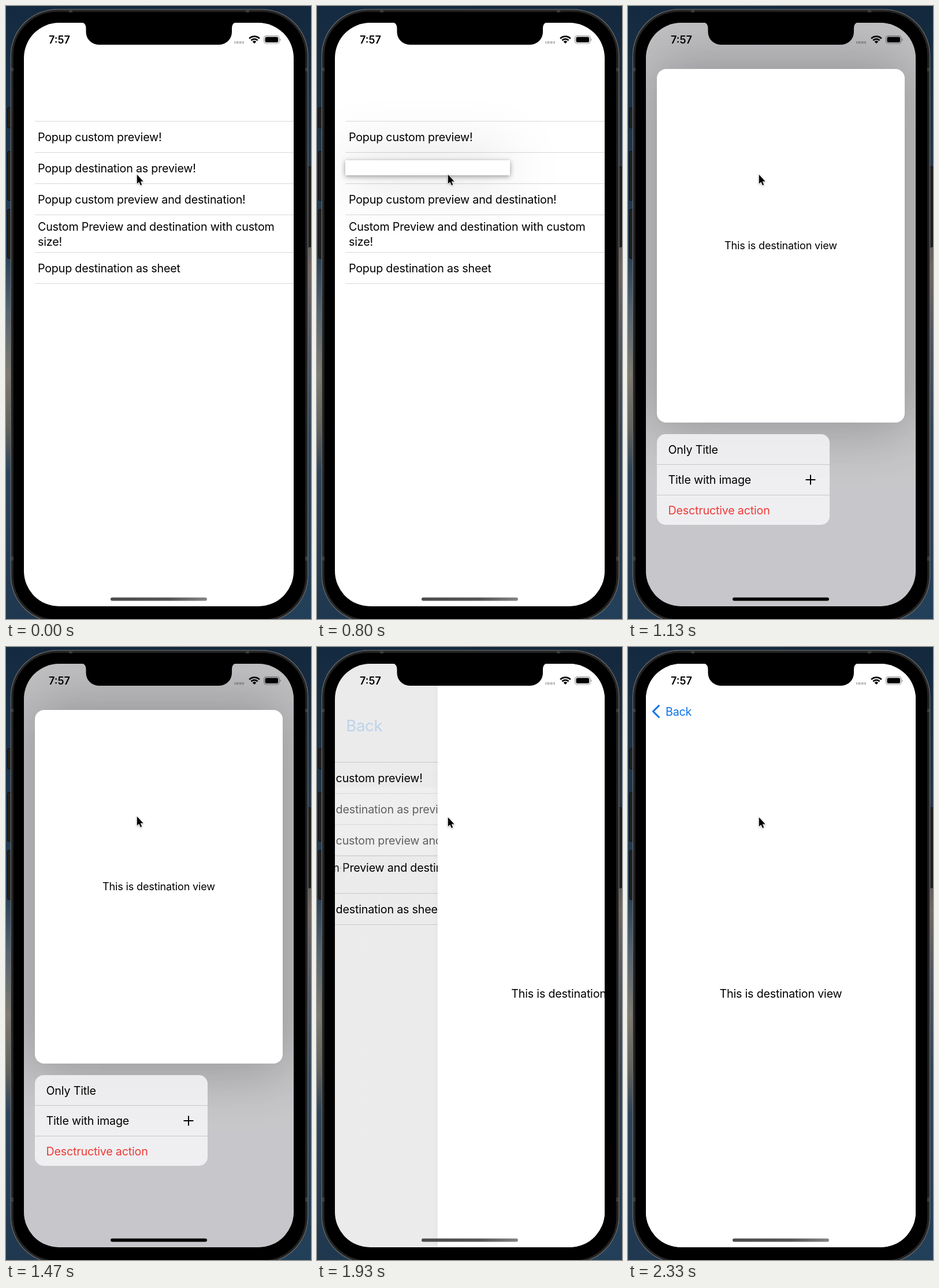
Recreate the animation shown at these times as an HTML page. Size 528 by 1061 pixels, loop 2.47 s.

```html
<!DOCTYPE html>
<html lang="en">
<head>
<meta charset="utf-8">
<title>Context menu preview</title>
<style>
html, body { margin: 0; width: 100%; height: 100%; overflow: hidden; background: #000; }
#stage { position: absolute; left: 0; top: 0; width: 528px; height: 1061px; overflow: hidden;
  font: 19.7px/0 Inter, sans-serif; letter-spacing: -.2px; font-optical-sizing: none; color: #000; }
#stage div, #stage svg { position: absolute; }
.t { white-space: nowrap; line-height: 0; }
.line { height: 1px; background: #d8d8da; }
#screen { left: 31px; top: 29px; width: 467px; height: 1010px; border-radius: 61px; overflow: hidden; background: #fff; }
/* children of the screen use stage coordinates */
#world { left: -31px; top: -29px; width: 528px; height: 1061px; }
#scrim, #dim { left: 0; top: 0; width: 528px; height: 1061px; }
#scrim { background: linear-gradient(rgba(0,0,14,.25), rgba(0,0,18,.22) 18%, rgba(0,0,18,.22)); }
#dim { background: #000; }
#preview { background: #fff; }
#clip { inset: 0; overflow: hidden; border-radius: inherit; }
#content { left: 0; top: 0; width: 467px; height: 666px; line-height: 666px; text-align: center;
  white-space: nowrap; transform-origin: 0 0; }
#menu { width: 299px; height: 157px; border-radius: 15px; overflow: hidden; transform-origin: 0 0;
  background: rgba(246,246,248,.85); }
#menu .line { left: 0; width: 299px; background: #c6c6c9; }
#page { left: 31px; top: 0; width: 467px; height: 1061px; background: #fff; box-shadow: 0 0 14px rgba(0,0,0,.04); }
#back { left: 0; top: 0; color: #0a74e8; transform-origin: 0 0; }
</style>
</head>
<body>
<div id="stage">
  <svg width="528" height="1061">
    <defs>
      <linearGradient id="left" x2="0" y2="1">
        <stop offset="0" stop-color="#142a40"/><stop offset=".4" stop-color="#243d54"/>
        <stop offset=".5" stop-color="#566572"/><stop offset=".6" stop-color="#7f7c70"/>
        <stop offset=".69" stop-color="#63635d"/><stop offset=".76" stop-color="#2c445a"/>
        <stop offset="1" stop-color="#1f384f"/>
      </linearGradient>
      <linearGradient id="right" x2="0" y2="1">
        <stop offset="0" stop-color="#13283d"/><stop offset=".26" stop-color="#243649"/>
        <stop offset=".43" stop-color="#71665e"/><stop offset=".53" stop-color="#535761"/>
        <stop offset=".7" stop-color="#2e4458"/><stop offset="1" stop-color="#223f59"/>
      </linearGradient>
    </defs>
    <rect width="264" height="1061" fill="url(#left)"/>
    <rect x="264" width="264" height="1061" fill="url(#right)"/>
    <g fill="#202020" stroke="#0b0b0b">
      <rect x="2.5" y="176" width="10" height="35" rx="2"/>
      <rect x="2.5" y="251.5" width="10" height="85" rx="2"/>
      <rect x="2.5" y="352" width="10" height="85" rx="2"/>
      <rect x="518" y="278" width="10" height="139" rx="2"/>
    </g>
    <rect x="8.5" y="6" width="514" height="1060" rx="80" stroke="#68686a" stroke-width="1.6"/>
    <rect x="11" y="8.5" width="509" height="1055" rx="77" stroke="#242424" stroke-width="3.5"/>
    <path d="M109 9H115M415 9H421M11 107V113M11 953V960M520 107V113M520 953V960" stroke="#3c3c3c" stroke-width="4"/>
  </svg>

  <div id="screen"><div id="world">
    <div id="under">
      <div id="list"></div>
    </div>
    <div id="scrim"></div>
    <div id="float">
      <div id="preview"><div id="clip"><div id="content">This is destination view</div></div></div>
      <div id="menu">
        <svg width="299" height="157"><path d="M257.5 79H274.5M266 70.5V87.5" stroke="#000" stroke-width="2"/></svg>
      </div>
    </div>
    <div id="dim"></div>
    <div id="page"></div>
    <svg id="chevron" width="528" height="140" fill="none" stroke="#0a74e8" stroke-width="3" stroke-linecap="round" stroke-linejoin="round">
      <path d="M53.5 101.5L43.5 111.5L53.5 121.5"/>
    </svg>
    <div id="back" class="t">Back</div>
  </div></div>

  <svg width="528" height="1061">
    <defs>
      <linearGradient id="bar"><stop stop-color="#4c4c4c"/><stop offset=".6" stop-color="#555"/><stop offset="1" stop-color="#858585"/></linearGradient>
    </defs>
    <path d="M128 28Q138.5 28 138.5 39V45A22 22 0 0 0 160.5 67H369A22 22 0 0 0 391 45V39Q391 28 401 28Z"/>
    <path d="M395.1 63.1H412" stroke="#000" stroke-opacity=".25" stroke-width="4.2" stroke-dasharray="4.2 1.1" stroke-dashoffset="2.1"/>
    <path d="M421.2 56.2A12.5 12.5 0 0 1 438.8 56.2M424.4 59.4A8 8 0 0 1 435.6 59.4" fill="none" stroke="#000" stroke-width="2.8"/>
    <path d="M430 65L426.7 61.7A4.6 4.6 0 0 1 433.3 61.7Z"/>
    <rect x="446.6" y="51.6" width="26.4" height="13.4" rx="4" fill="none" stroke="#000" stroke-opacity=".4" stroke-width="1.2"/>
    <rect x="448.5" y="53.5" width="22.6" height="9.6" rx="2.4"/>
    <path d="M474.4 56.2Q477 58.3 474.4 60.4Z" fill-opacity=".45"/>
    <rect x="181" y="1023.7" width="167" height="5.8" rx="2.9" id="home"/>
    <g id="cursor" style="filter:drop-shadow(0 1.5px 1.5px rgba(0,0,0,.3))">
      <path d="M226.8 291.8V307.6L230.4 304.4L232.9 310.2L235.2 309.2L232.8 303.4H237.6Z"
        stroke="#fff" stroke-width="1.4" paint-order="stroke"/>
    </g>
  </svg>
</div>

<script>
const $ = id => document.getElementById(id);
const LOOP = 2470, STEP = 200 / 3;
const clamp = v => Math.min(1, Math.max(0, v));
const mix = (a, b, p) => a + (b - a) * p;
const ramp = (t, a, b) => clamp((t - a) / (b - a));

// critically damped spring from 0 to 1, settling fully at the end
function spring(t, start, speed) {
  const x = Math.max(0, t - start) * speed / 1000;
  return clamp(1.003 * (1 - (1 + x) * Math.exp(-x)));
}

function add(parent, cls, text, style) {
  const el = document.createElement('div');
  el.className = cls;
  el.textContent = text;
  Object.assign(el.style, style);
  $(parent).append(el);
}
const label = (parent, text, x, y, more) =>
  add(parent, 't', text, { left: x + 'px', top: y + 'px', ...more });

[['Popup custom preview!', 227], ['Popup destination as preview!', 281],
 ['Popup custom preview and destination!', 335],
 ['Custom Preview and destination with custom', 381.5], ['size!', 408],
 ['Popup destination as sheet', 454]].forEach(([s, y]) => label('list', s, 55, y));
for (const y of [199, 253, 307, 361, 426, 480])
  add('list', 'line', '', { left: '50px', top: y + 'px', width: '448px' });

['Only Title', 'Title with image', 'Desctructive action'].forEach((s, i) => {
  label('menu', s, 19.5, 26.5 + 52.5 * i, { color: i == 2 ? '#ee3a34' : '#000' });
  if (i) add('menu', 'line', '', { top: 52.5 * i - .5 + 'px' });
});
label('page', 'This is destination view', 0, 600, { width: '467px', textAlign: 'center' });
label('stage', '7:57', 74, 58.5, { font: '600 18px/0 Inter, sans-serif', letterSpacing: 0 });

function draw(t) {
  const lift = 1 - (1 - ramp(t, 460, 790)) ** 2;
  const closing = t > 1792;
  const open = closing ? 1 - spring(t, 1792, 23.5) : spring(t, 800, 24.5);
  const push = spring(t, 1806, 16.4);
  const rest = 1 - push;

  // list and floating parts drift left while the page slides in
  const drift = `translateX(${-.3 * 467 * push}px)`;
  $('under').style.transform = $('float').style.transform = drift;
  const haze = clamp((open - .3) / .5);
  $('list').style.filter = haze ? `blur(${24 * haze}px)` : 'none';
  $('list').style.opacity = 1 - haze;
  $('scrim').style.opacity = open;
  $('dim').style.opacity = .07 * push;

  // preview grows out of the lifted row
  const x = mix(55 - 6 * lift, 50, open), y = mix(268.5 - 1.5 * lift, 109, open);
  const w = mix(273 + 12 * lift, 429, open), h = mix(24 + 2 * lift, 612, open);
  const shade = closing ? open : lift;
  const edge = closing ? 0 : lift * (1 - open);
  Object.assign($('preview').style, {
    left: x + 'px', top: y + 'px', width: w + 'px', height: h + 'px',
    borderRadius: 16 * open + 'px',
    opacity: closing ? Math.sqrt(open) : lift > 0 ? 1 : 0,
    boxShadow: `0 2px 9px rgba(0,0,0,${.4 * edge}), 0 0 100px ${14 * open}px rgba(0,0,0,${.26 * shade})`
  });
  $('content').style.transform = `scale(${w / 467})`;
  $('content').style.opacity = clamp(1.3 * open);

  const size = .17 + .83 * open;
  Object.assign($('menu').style, {
    left: x + 'px', top: y + h + 20 * size ** 3 + 'px', height: 157 * (.8 + .2 * open) + 'px',
    transform: `scale(${size})`, opacity: clamp(1.09 * open)
  });

  $('page').style.transform = `translateX(${467 * rest}px)`;
  $('page').style.visibility = push ? 'visible' : 'hidden';
  $('back').style.transform = `translate(${65 - 39 * rest}px, ${112 + 63 * rest}px) scale(${1 + 1.05 * rest})`;
  $('back').style.opacity = clamp(1 - 2.1 * rest);
  $('chevron').style.opacity = push ** 12;

  $('home').setAttribute('fill', t > 1130 && t < 1660 ? '#000' : 'url(#bar)');
  const dy = 1.5 * ramp(t, 1130, 1470) + 1.5 * ramp(t, 1470, 1740);
  $('cursor').setAttribute('transform', `translate(0 ${dy})`);
}

const begin = performance.now();
function tick() {
  const t = (performance.now() - begin) % LOOP;
  // fifteen pictures a second, resting on the last
  draw(Math.min(35, Math.floor(t / STEP + .06)) * STEP);
  requestAnimationFrame(tick);
}
tick();
</script>
</body>
</html>
```
